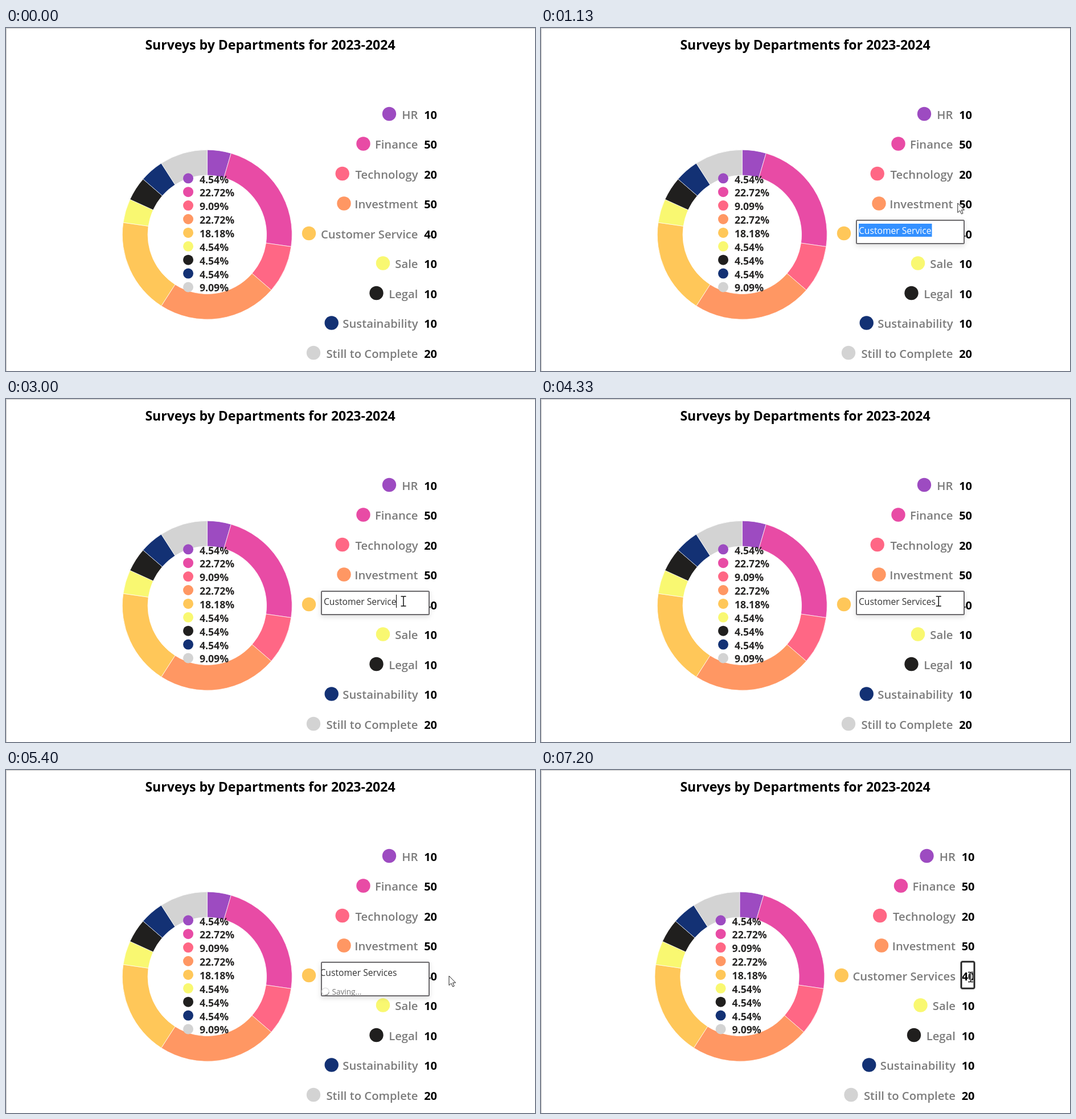
An HTML page for the animation above (8000 ms loop, 929x603 px).

```html
<!DOCTYPE html>
<html lang="en">
<head>
<meta charset="utf-8">
<title>Surveys by Departments</title>
<style>
  html, body { margin: 0; width: 100%; height: 100%; overflow: hidden; background: #fff; }
  svg { display: block; width: 929px; height: 603px; font-family: "Open Sans", "Noto Sans", sans-serif; }
  .title { font-size: 23.05px; font-weight: 700; text-anchor: middle; }
  .percent { font-size: 17.6px; font-weight: 700; fill: #252423; }
  .label { font-size: 20.25px; font-weight: 600; fill: #7c7c7c; text-anchor: end; }
  .value { font-size: 20px; font-weight: 700; text-anchor: end; }
  .input { font-size: 15.65px; }
  .saving { font-size: 13.6px; fill: #777; }
  .box { fill: #fff; stroke: #6c6a6d; stroke-width: 2; filter: drop-shadow(0 3px 4px #0002); }
</style>
</head>
<body>
<script>
const LOOP = 8000;
const rows = [
  // name, surveys, share, colour, dot x
  ["HR", 10, "4.54%", "#9d4bc1", 673],
  ["Finance", 50, "22.72%", "#e84ba5", 627.5],
  ["Technology", 20, "9.09%", "#ff6785", 590.7],
  ["Investment", 50, "22.72%", "#ff9763", 593.5],
  ["Customer Service", 40, "18.18%", "#ffc759", 532],
  ["Sale", 10, "4.54%", "#f9f871", 662],
  ["Legal", 10, "4.54%", "#201f1e", 650.5],
  ["Sustainability", 10, "4.54%", "#133174", 571.7],
  ["Still to Complete", 20, "9.09%", "#d3d3d3", 540]
];
const EDITED = 4;

function add(parent, tag, attrs = {}, text) {
  const node = document.createElementNS("http://www.w3.org/2000/svg", tag);
  set(node, attrs);
  if (text !== undefined) node.textContent = text;
  parent.append(node);
  return node;
}
function set(node, attrs) {
  for (const key in attrs) node.setAttribute(key, attrs[key]);
}
function show(node, on) {
  node.style.display = on ? "" : "none";
}
const within = (t, from, to) => t >= from && t < to;
const label = (parent, cls, x, y, text) => add(parent, "text", { class: cls, x, y }, text);
const box = (parent, x, y, width, height) =>
  add(parent, "rect", { class: "box", x, y, width, height, rx: 1.5 });

const svg = add(document.body, "svg", { viewBox: "0 0 929 603" });
add(svg, "path", { d: "M.5 603V.5H929", fill: "none", stroke: "#c4c4c4" });
label(svg, "title", 464, 38, "Surveys by Departments for 2023-2024");

// Donut with the percentage list
const donut = add(svg, "g");
const total = rows.reduce((sum, row) => sum + row[1], 0);
const polar = (r, turn) => {
  const a = turn * 2 * Math.PI;
  return `${353.3 + r * Math.sin(a)} ${363.2 - r * Math.cos(a)}`;
};
let sum = 0;
for (const [, count, , fill] of rows) {
  const a = sum / total, b = (sum += count) / total;
  add(donut, "path", {
    d: `M${polar(149, a)}A149 149 0 0 1 ${polar(149, b)}L${polar(104.3, b)}A104.3 104.3 0 0 0 ${polar(104.3, a)}Z`,
    fill, stroke: "#fff", "stroke-width": 0.7
  });
}
rows.forEach(([, , share, fill], i) => {
  add(donut, "circle", { cx: 320, cy: 264.3 + i * 23.9, r: 9, fill });
  label(donut, "percent", 340, 272.6 + i * 23.85, share);
});

// Legend
const legend = add(svg, "g");
const items = rows.map(([name, count, , fill, x], i) => {
  const y = 151 + i * 52.5;
  const dot = add(legend, "circle", { cx: x, cy: y, r: 12.2, fill });
  const text = label(legend, "label", 723.5, y + 8.7, name);
  label(legend, "value", 757, y + 8.7, count);
  return { dot, text };
});

function makeSpinner(parent, cx, cy, r, width) {
  add(parent, "circle", { cx, cy, r, fill: "none", stroke: "#dcdcdc", "stroke-width": width });
  const arc = add(parent, "path", {
    d: `M${cx} ${cy - r}A${r} ${r} 0 0 1 ${cx + r} ${cy}`,
    fill: "none", stroke: "#909090", "stroke-width": width
  });
  return angle => set(arc, { transform: `rotate(${angle} ${cx} ${cy})` });
}

// Loading box, used for the label and for the number
const loader = add(svg, "g");
set(box(loader, 738.5, 342, 189, 45.5), { style: "stroke:#949494" });
const spinLoader = makeSpinner(loader, 832.5, 365, 11, 1.8);

// Text editor
const editor = add(svg, "g");
const frame = box(editor, 554, 338, 189, 41);
const clip = add(add(svg, "clipPath", { id: "inside" }), "rect", { x: 554, y: 339, width: 188, height: 57 });
const content = add(editor, "g", { "clip-path": "url(#inside)" });
const selection = add(content, "rect", { x: 558, y: 344, width: 128.5, height: 23, fill: "#3390ff" });
const typed = label(content, "input", 558, 362, "");
const caret = add(content, "rect", { y: 344, width: 1, height: 23 });
const saving = add(content, "g");
const spinSaving = makeSpinner(saving, 561, 389.5, 6.3, 1.3);
label(saving, "saving", 572.5, 395, "Saving...");

// Focused number
const focus = add(svg, "g");
const ring = { x: 738, y: 337, width: 23, height: 47, rx: 2.5, fill: "none" };
add(focus, "rect", { ...ring, stroke: "#999", "stroke-width": 4 });
add(focus, "rect", { ...ring, stroke: "#222", "stroke-width": 2 });

// Pointer
const marker = add(svg, "circle", { r: 13, fill: "#ffff5c", opacity: 0.85 });
const arrow = add(svg, "path", {
  d: "M0 0V16.5L3.9 13L6.6 19L9.2 17.8L6.6 12H11.6Z", fill: "#fff", stroke: "#222", "stroke-width": 1
});
const beam = add(svg, "g");
const beamShape = "M-4.5 -8.5H-1Q0 -8.5 0 -7.5Q0 -8.5 1 -8.5H4.5M0 -8V8M-4.5 8.5H-1Q0 8.5 0 7.5Q0 8.5 1 8.5H4.5";
add(beam, "path", { d: beamShape, fill: "none", stroke: "#fff", "stroke-width": 3 });
add(beam, "path", { d: beamShape, fill: "none", stroke: "#111", "stroke-width": 1.5 });

const track = [
  [230, 877, 588], [640, 716, 360], [860, 716, 360], [1000, 732, 311], [1130, 732, 308],
  [1740, 615, 285], [1870, 615, 285], [2060, 784, 318], [2270, 685, 349], [2480, 698, 355.5],
  [4330, 698, 355.5], [4660, 778, 362], [5940, 778, 362], [6010, 752, 363], [7070, 752, 363],
  [7200, 754.5, 364]
];
function pointerAt(t) {
  const next = track.findIndex(point => point[0] > t);
  if (next === 0) return track[0].slice(1);
  if (next < 0) return track[track.length - 1].slice(1);
  const [t0, x0, y0] = track[next - 1], [t1, x1, y1] = track[next];
  const k = (t - t0) / (t1 - t0);
  return [x0 + (x1 - x0) * k, y0 + (y1 - y0) * k];
}

const clicks = [[640, 780], [2800, 3000], [4870, 5000], [6010, 6200]];

function render(t) {
  const reloaded = t >= 5540;
  set(donut, { transform: `translate(${reloaded ? -4.4 : 0} 0)` });
  set(legend, { transform: `translate(${reloaded ? 4.5 : 0} 0)` });
  items[EDITED].text.textContent = reloaded ? "Customer Services" : "Customer Service";
  set(items[EDITED].dot, { cx: reloaded ? 523.3 : 532 });

  const loadingLabel = within(t, 780, 1000);
  show(loader, loadingLabel || within(t, 6070, 6320));
  set(loader, { transform: `translate(${loadingLabel ? -184 : 0} 0)` });
  spinLoader((t - 6130) * 0.36);

  const isSaving = t >= 5060;
  const selected = t < 3000;
  show(editor, within(t, 1000, 5470));
  set(frame, { height: isSaving ? 59 : 41 });
  show(selection, selected);
  typed.textContent = t < 3800 ? "Customer Service" : "Customer Services";
  set(typed, { x: isSaving ? 551.5 : 558, fill: selected ? "#fff" : "#333" });
  show(caret, within(t, 3000, 3530) || within(t, 3800, 4330));
  set(caret, { x: t < 3800 ? 685 : 693 });
  show(saving, isSaving);
  spinSaving((t - 5250) * 0.36 + 45);

  show(focus, t >= 7070);

  const [x, y] = pointerAt(t);
  const useBeam = within(t, 2200, 4530) || t >= 7070;
  show(arrow, t >= 230 && !useBeam);
  show(beam, useBeam);
  set(arrow, { transform: `translate(${x} ${y})` });
  set(beam, { transform: `translate(${x} ${y})` });
  show(marker, clicks.some(([from, to]) => within(t, from, to)));
  set(marker, { cx: x, cy: y });
}

const start = performance.now();
function tick(now) {
  render(Math.max(0, now - start) % LOOP);
  requestAnimationFrame(tick);
}
render(0);
requestAnimationFrame(tick);
</script>
</body>
</html>
```
